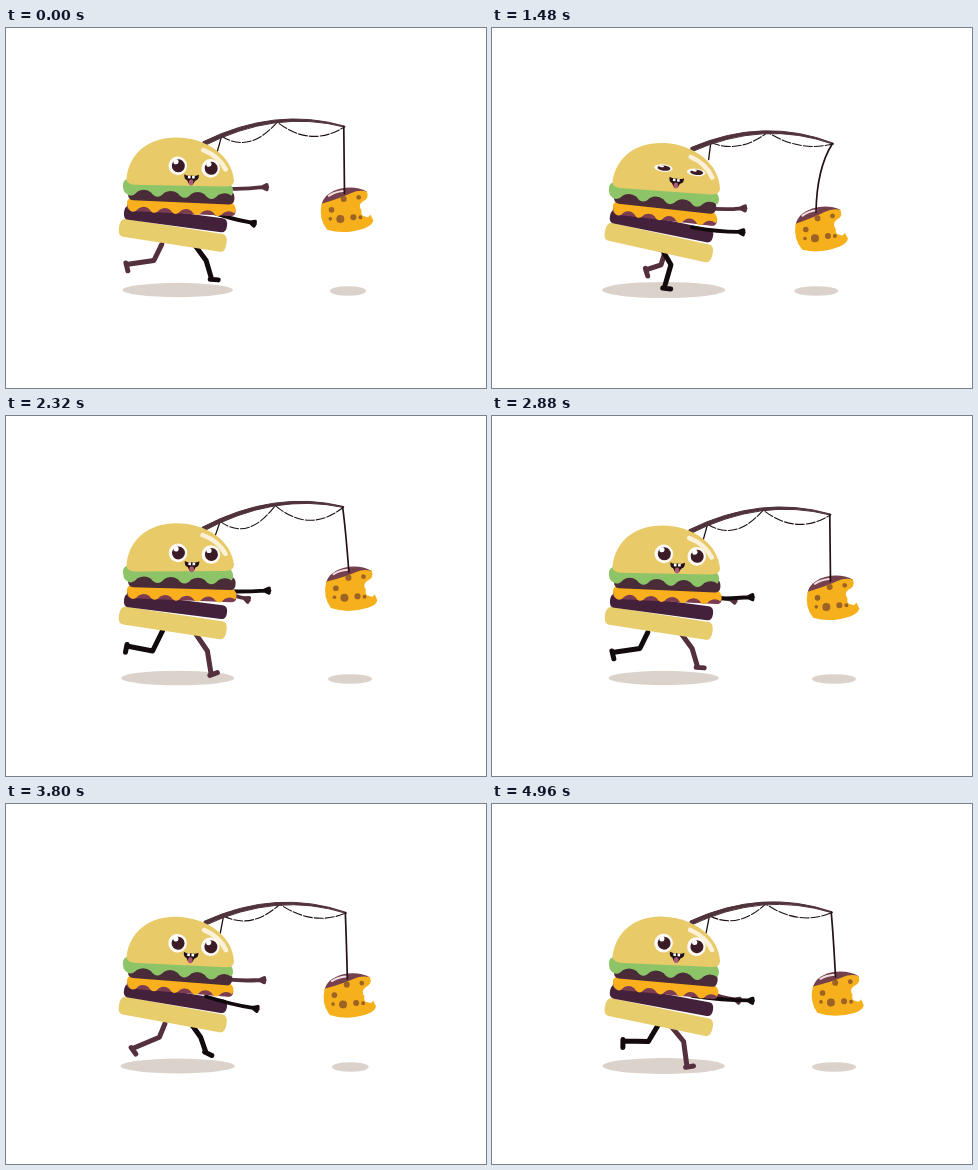
An HTML page for the animation above (5000 ms loop, 480 px wide and 360 px high).

```html
<!DOCTYPE html>
<html lang="en">
<head>
<meta charset="utf-8">
<title>Burger run</title>
<style>
html, body { margin: 0; width: 100%; height: 100%; overflow: hidden; background: #fff; }
svg { display: block; width: 100vw; height: 100vh; }
</style>
</head>
<body>
<svg id="stage" viewBox="0 0 480 360"></svg>
<script>
const LOOP = 5000, STEP = 40, STRIDE = 640;
const NEAR = '#120a0d', FAR = '#54303f', ROD = '#4f323a', THREAD = '#1c1012', SHADE = '#dbd3cb';
const { sin, cos, max, abs, hypot, atan2, PI } = Math;
const stage = document.getElementById('stage');

function set(el, attrs) {
  for (const k in attrs) el.setAttribute(k, attrs[k]);
}
function add(tag, attrs = {}, parent = stage) {
  const el = document.createElementNS('http://www.w3.org/2000/svg', tag);
  set(el, attrs);
  parent.appendChild(el);
  return el;
}
const line = (color, width, parent) => add('path', {
  fill: 'none', stroke: color, 'stroke-width': width,
  'stroke-linecap': 'round', 'stroke-linejoin': 'round'
}, parent);

// Two bounces per stride; lift is 1 at the top of a hop, -1 at the bottom.
const lift = (ph, lag = 1.2) => cos(2 * ph - lag);
const bob = ph => -13.5 * lift(ph);

// ---- shadows, rod and lines
const bodyShadow = add('ellipse', { cx: 171.7, cy: 262, fill: SHADE });
const baitShadow = add('ellipse', { cy: 263, ry: 4.8, fill: SHADE });
const loops = line(THREAD, 1.1);
set(loops, { 'stroke-dasharray': '9 2' });
const lead = line(THREAD, 1.3);
const rod = add('path', { fill: ROD, stroke: ROD });

// ---- bait
const bait = add('g');
add('path', { d: 'M-25,-5Q-23,-16 -8,-21Q8,-25 20,-19L16,-10L-20,-2Z', fill: '#74404d' }, bait);
set(line('#f3dfe2', 2, bait), { d: 'M-18,-14Q-12,-18 -4,-19' });
add('path', {
  d: 'M-25,-6Q-6,-12 4,-17Q12,-21 20,-19Q23,-12 16,-9Q11,-5 15,0Q14,6 19,6Q22,8 24,4L27,10Q26,15 18,18Q-2,25 -19,20Q-28,9 -25,-6Z',
  fill: '#f6b01b'
}, bait);
for (const [cx, cy, r] of [[-6, 9, 4], [7, 7, 3], [-15, 0, 2.8], [-3, -11, 3], [12, -13, 2.4], [14, 7, 2], [-16, 9, 1.8]])
  add('circle', { cx, cy, r, fill: '#9c6226' }, bait);
const string = line('#241216', 1.7);

// ---- limbs behind the body
const farArm = line(FAR, 3.8);
const farLeg = line(FAR, 5);
const nearLeg = line(NEAR, 5);

// ---- layer shapes: local x runs 0..100 from the left end to the right end
function slab(top, low) {
  const y = (low + top) / 2;
  return `M5,${top}H95Q100,${top} 100,${y}Q100,${low} 95,${low}H5Q0,${low} 0,${y}Q0,${top} 5,${top}Z`;
}
function drips(top, low, amp, n) {
  const w = 98 / n;
  let d = `M3,${top}H97Q102,${(top + low) / 2} 99,${low}`;
  for (let i = 0; i < n; i++) {
    const x = 99 - i * w;
    d += `q${-w / 4},${-amp} ${-w / 2},0Q${x - w * .75},${low + amp * 2} ${x - w},${low}`;
  }
  return d + `Q-2,${top + 2} 3,${top}Z`;
}
const dome = 'M0,0C2,-27 22,-42 46,-42C75,-42 98,-24 100,0Q100,6 92,6L7,6Q0,5 0,0Z';

// Bottom to top; y is the left end at rest, tilt the drop of the right end.
const layers = [
  { x: 113, w: 107.5, y: 200.5, tilt: 19.5, parts: [['#e8cd6c', slab(-9, 9)]] },
  { x: 118, w: 103, y: 185.5, tilt: 16.5, parts: [['#43213a', slab(-7, 7)]] },
  { x: 121, w: 107, y: 177, tilt: 8, slip: 3, parts: [['#7c3c52', slab(-3, 7)], ['#f9b01c', drips(-6, 4, 3.6, 5)]] },
  { x: 122, w: 105, y: 167, tilt: 7, slip: 3, parts: [['#4a2b38', slab(-7, 6)]] },
  { x: 117, w: 110, y: 158, tilt: 6.5, parts: [['#8ec468', drips(-6, 6, 4.2, 4)]] },
  { x: 120.5, w: 107.5, y: 151.5, tilt: 3.5, parts: [['#e8ca68', dome]], shine: true }
];
let nearArm;
layers.forEach((l, i) => {
  if (i === 2) nearArm = line(NEAR, 3.8);
  l.lag = .85 + .07 * i;
  l.el = add('g');
  for (const [fill, d] of l.parts) add('path', { fill, d }, l.el);
  if (l.shine) set(line('#fbf0d8', 4.5, l.el), { d: 'M71,-30Q86,-24 92,-11' });
});

// ---- face, centred on the mouth
const face = add('g');
const eyes = [[-14, -11], [19, -10]].map(([x, y]) => {
  const el = add('g', {}, face);
  add('circle', { r: 9.3, fill: '#fffaf5' }, el);
  add('circle', { cx: .5, r: 6.5, fill: '#3a1b26' }, el);
  add('circle', { cx: -2, cy: -4, r: 2.6, fill: '#fff' }, el);
  return { el, x, y };
});
add('path', { d: 'M-7,-3Q-4,-1 0,-2Q4,-1 7.5,-3Q8,2 4,3L2.5,6Q0,9 -2.5,6L-4,3Q-7.5,2 -7,-3Z', fill: '#241017' }, face);
add('ellipse', { cy: 5, rx: 2.3, ry: 3, fill: '#b05878' }, face);
add('path', { d: 'M-3.4,-1.6h2.6v2.6h-2.6zM.8,-1.6h2.6v2.6h-2.6z', fill: '#fff' }, face);

function drawArm(el, sx, sy, hx, hy) {
  const a = atan2(hy - sy, hx - sx);
  const px = hx - 6 * cos(a), py = hy - 6 * sin(a);
  let d = `M${sx},${sy}Q${(sx + hx) / 2},${(sy + hy) / 2 + 2} ${px},${py}`;
  for (const turn of [-.45, 0, .45]) d += `M${px},${py}l${5 * cos(a + turn)},${5 * sin(a + turn)}`;
  set(el, { d });
}

function drawArms(ph) {
  const b = bob(ph), pull = cos(ph - .86);
  drawArm(nearArm, 200, 187 + b, 256 - 8.5 * cos(ph - .785), 193.5 + 7.6 * cos(ph - .2) + b);
  drawArm(farArm, 212, 173 - 12 * pull + b, 253.5 + 10 * cos(ph - .5), 177 - 20 * pull + b);
}

// The foot circles the hip; kick holds it longer on the ground and behind.
function drawLeg(el, ph) {
  const kick = -cos(2 * ph) * sin(ph);
  const hx = 172 + 17 * cos(ph - .3), hy = 218 - 4.5 * lift(ph);
  const kx = 174 + 29 * cos(ph - .45) + 5 * kick, ky = 235 - 2.5 * cos(2 * ph);
  const ax = 163 + 46 * cos(ph - .38) + 15 * kick;
  const ay = 247 + 15 * cos(ph - 1.05) - 4 * cos(2 * ph - .7);
  const f = .7 - 1.08 * cos(ph - .95), fx = cos(f), fy = sin(f);
  set(el, { d: `M${hx},${hy}L${kx},${ky}L${ax},${ay}m${-1.5 * fx},${-1.5 * fy}l${8 * fx},${8 * fy}` });
}

function drawLayer({ el, x, w, y, tilt, lag, slip = 0 }, ph) {
  const up = lift(ph, lag);
  const dx = w + slip * up, dy = tilt - 4.4 * up, len = hypot(dx, dy);
  set(el, { transform: `matrix(${dx / 100},${dy / 100},${-dy / len},${dx / len},${x},${y - 2.2 * up})` });
}

function drawRod(ph) {
  const up = lift(ph);
  const at = (x, y, kx, ky) => [x - kx * up, y - ky * up];
  const [bx, by] = at(197.5, 117.5, 1.5, 4.5), [tx, ty] = at(339.5, 103.5, 2, 13.4);
  const [cx, cy] = at(270, 82.5, 2, 8);
  set(rod, { d: `M${bx},${by - 2}Q${cx},${cy - 1.5} ${tx},${ty - .5}v1Q${cx},${cy + 1.5} ${bx},${by + 2.5}Z` });
  const [gx, gy] = at(216.5, 110, 2.5, 5), [mx, my] = at(272.5, 97, 3.5, 8);
  set(loops, { d: `M${gx},${gy}Q${(gx + mx) / 2},126 ${mx},${my}Q${(mx + tx) / 2},${121.5 - 3.5 * up} ${tx},${ty}` });
  set(lead, { d: `M${gx},${gy}L${at(212.5, 127, 4.5, 5)}` });
  return [tx - 1, ty];
}

function drawBait(ph, [tx, ty]) {
  const s = sin(ph), c2 = cos(2 * ph);
  const x = 338.5 - 9 * s + 2 * c2, y = 187 + 2 * s + bob(ph);
  const ax = x - 2 - max(0, 3 * s), ay = y - 17;
  set(bait, { transform: `translate(${x},${y})rotate(${1 - 2.5 * s})` });
  set(string, { d: `M${tx},${ty}Q${(tx + ax) / 2 - max(0, 8 * s)},${ty + (ay - ty) * .36} ${ax},${ay}` });
  set(baitShadow, { cx: 337 - 10 * s + 5 * c2, rx: 22 - 4 * max(0, cos(ph)) });
}

function drawFace(t, ph) {
  const up = lift(ph), open = 1 - .6 * max(0, 1 - abs(t - 1480) / 120);
  set(face, { transform: `translate(${185 + .8 * up},${150.3 - 2.3 * up})rotate(${3.5 - 2.5 * up})` });
  for (const { el, x, y } of eyes) set(el, { transform: `translate(${x},${y})scale(1,${open})` });
}

function draw(t) {
  const ph = t % STRIDE / STRIDE * 2 * PI;
  const rx = 58.2 - 3.5 * lift(ph, .5);
  set(bodyShadow, { rx, ry: rx * .13 });
  drawBait(ph, drawRod(ph));
  drawArms(ph);
  drawLeg(nearLeg, ph);
  drawLeg(farLeg, ph + PI);
  for (const l of layers) drawLayer(l, ph);
  drawFace(t, ph);
}

function tick() {
  draw(Math.floor(performance.now() % LOOP / STEP) * STEP);
  requestAnimationFrame(tick);
}
tick();
</script>
</body>
</html>
```
